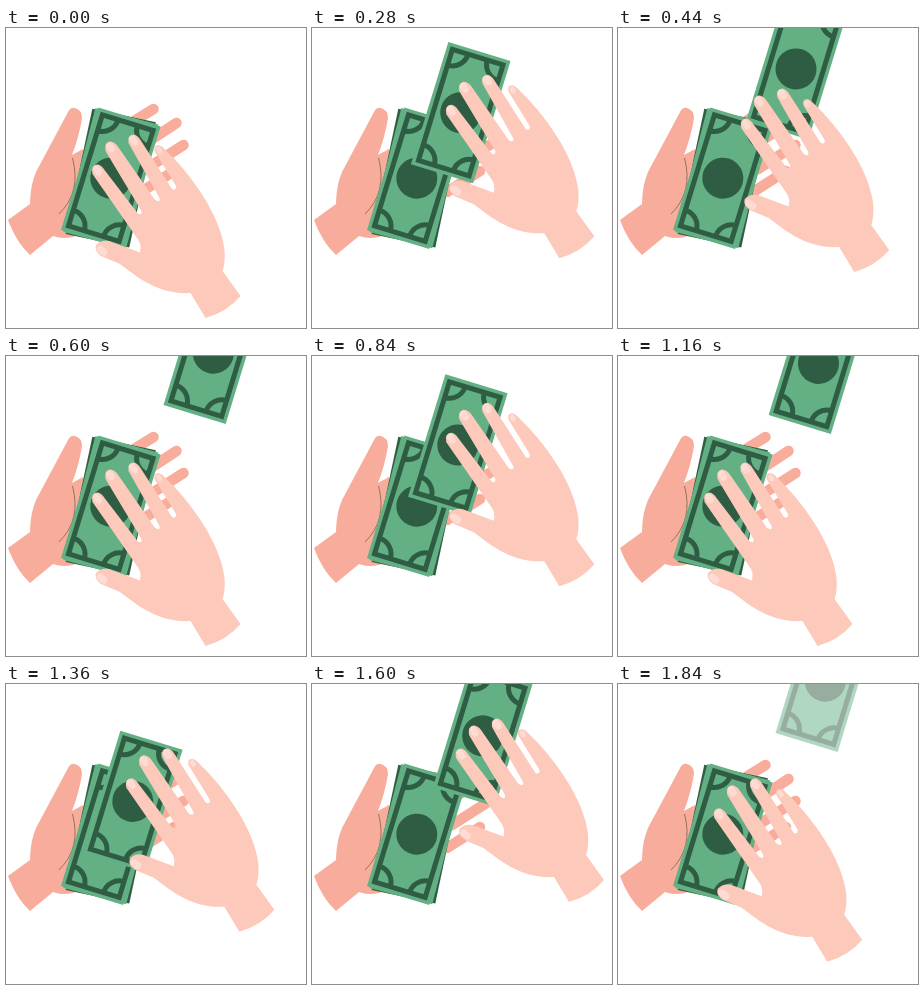
An HTML page for the animation above (1880 ms loop, 300 by 300 pixels).

```html
<!DOCTYPE html>
<html lang="en">
<head>
<meta charset="utf-8">
<title>Throwing bills</title>
<style>
  html, body { margin: 0; height: 100%; overflow: hidden; background: #fff; }
  svg { display: block; width: 100vw; height: 100vh; }
  .back { fill: #f8ac9b; }
  .front { fill: #fdc9bb; }
  .nail { stroke: #fedcd3; stroke-width: 7; stroke-linecap: round; }
  .fingers { fill: none; stroke: #f8ac9b; stroke-width: 10.5; stroke-linecap: round; }
  .ink { fill: none; stroke: #2f5d43; stroke-width: 5; }
</style>
</head>
<body>
<svg viewBox="0 0 300 300">
  <defs>
    <g id="bill">
      <rect x="-32.5" y="-64" width="65" height="128" fill="#62b084"/>
      <rect class="ink" x="-26.5" y="-58" width="53" height="116"/>
      <path class="ink" d="M-10-58A16.500 16.500 0 0 1-26.500-41.500M10-58A16.500 16.500 0 0 0 26.500-41.500
        M-10 58A16.500 16.500 0 0 0-26.500 41.500M10 58A16.500 16.500 0 0 1 26.500 41.500"/>
      <circle r="20.5" fill="#2f5d43"/>
    </g>
  </defs>

  <!-- holding hand -->
  <path class="fingers" d="M120 98L147.500 81M140 115L170.500 95M140 141L177.500 117M135 164L168 143"/>
  <path class="back" d="M61.500 85Q64 79 69 80Q76 82 76 90Q73 109 66 127L77 121L90 170L75 206
    Q60 213 47 208L24 227Q10 214 2 192L24 176Q24 158 30 144Z"/>
  <path d="M66.500 130Q75.500 164 53 186" fill="none" stroke="#96745f"/>

  <!-- stack -->
  <g transform="translate(104.8 150.2)">
    <rect x="-32.5" y="-64" width="65" height="128" fill="#2f5d43" transform="rotate(12)"/>
    <use href="#bill" transform="rotate(14.5)"/>
    <use href="#bill" transform="rotate(17)"/>
  </g>
  <g id="bills"></g>

  <!-- throwing hand -->
  <g id="hand">
    <path class="front" d="M86.500 146Q84.500 137 91.500 136.500Q95.500 137 98.500 142L131.500 185Q136 188 135.500 183
      L99.500 123Q98 115 103.500 113.500Q108.500 113.500 111.500 118L149 172Q154.500 175 153.500 170
      L122.500 115Q121 107 127.500 106.500Q131.500 107 134.500 112L166 161Q170.500 163 170 158
      L148.500 123Q147.500 117 152.500 117Q156.500 118 158.500 121C185 146 215 188 218.500 222Q219.500 235 216.500 243
      L234.500 268Q221 284 199.500 290L184.500 265C150 267 128 246 114 236L95 228Q88 223 90 217
      Q95 211.500 103 213L134 224.500Q136 216 131 210Z"/>
    <path class="nail" d="M90.500 141L92.500 144M103.500 118L105.500 121M126.500 111L128.500 114M94 221L98 224"/>
    <path class="nail" style="stroke-width:5" d="M152.500 121L153.500 123"/>
  </g>
</svg>
<script>
const LOOP = 1880, STEP = 40, FADE = 80;
const throws = [[40, 600], [600, 1200], [1240, 1800]];
// [start, end, from, to]
const swings = [
  [40, 320, 0, 1], [320, 600, 1, 0],
  [600, 880, 0, 1], [880, 1160, 1, 0],
  [1180, 1460, 0, 1], [1600, 1880, 1, 0]
];

const clamp = x => Math.max(0, Math.min(1, x));
const hand = document.getElementById('hand');
const group = document.getElementById('bills');
const bills = throws.map(() => {
  const bill = document.createElementNS('http://www.w3.org/2000/svg', 'use');
  bill.setAttribute('href', '#bill');
  return group.appendChild(bill);
});

function reach(t) {
  let value = 0;
  for (const [start, end, from, to] of swings) {
    if (t < start) break;
    value = from + (to - from) * clamp((t - start) / (end - start)) ** 1.2;
  }
  return value;
}

function draw(now) {
  const t = Math.floor(now % LOOP / STEP) * STEP;
  const r = reach(t);
  hand.setAttribute('transform', `translate(${57.5 * r} ${-72 * r})`);
  throws.forEach(([start, end], i) => {
    const p = clamp((t - start) / (end - start));
    bills[i].setAttribute('transform',
      `translate(${104.8 + 102.5 * p} ${150.2 - 153 * p}) rotate(17)`);
    bills[i].setAttribute('opacity', t > start ? clamp(1 - (t - end) / FADE) : 0);
  });
  requestAnimationFrame(() => draw(performance.now()));
}
draw(0);
</script>
</body>
</html>
```
